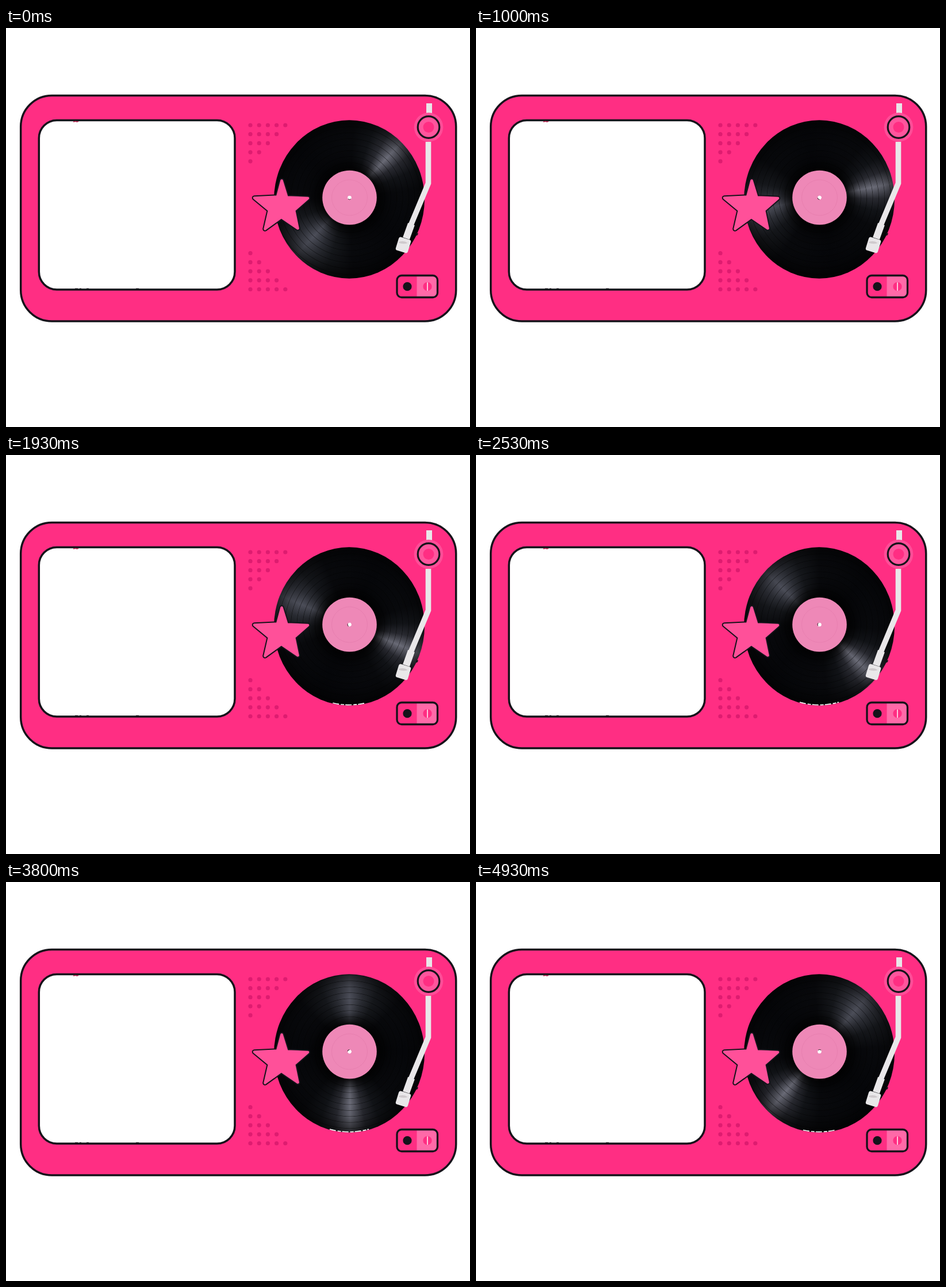
Recreate the animation shown at these times as an HTML page. Size 807x694 px, loop 4990 ms.

```html
<!DOCTYPE html>
<html lang="en">
<head>
<meta charset="utf-8">
<title>Record player</title>
<style>
  html, body { margin: 0; width: 100%; height: 100%; overflow: hidden; background: #fff; }
  svg { position: absolute; left: 0; top: 0; width: 807px; height: 694px; }
  #well {
    position: absolute; left: 0; top: 0; width: 807px; height: 694px;
    clip-path: ellipse(131px 137.7px at 597px 298px);
  }
  #record {
    position: absolute; left: 452.5px; top: 150px; width: 290px; height: 290px; border-radius: 50%;
    background:
      radial-gradient(circle, rgba(0,0,0,.8) 48px, rgba(0,0,0,.5) 58px, rgba(0,0,0,.12) 70px,
        rgba(0,0,0,0) 92px, rgba(0,0,0,.15) 114px, rgba(0,0,0,.6) 137px),
      repeating-radial-gradient(circle, transparent 0 8px, rgba(0,0,0,.5) 8.8px, transparent 9.6px 10.4px),
      conic-gradient(#050609, #08090c 50deg, #111317 66deg, #292a31 78deg, #6c6d79 90deg,
        #292a31 102deg, #111317 114deg, #08090c 130deg, #050609 180deg,
        #08090c 225deg, #15171b 245deg, #2a2c33 257deg, #4d4f5a 270deg,
        #2a2c33 283deg, #15171b 295deg, #08090c 315deg, #050609);
  }
</style>
</head>
<body>
<svg viewBox="0 0 807 694">
  <g stroke="#15131a" stroke-width="3.5">
    <rect x="25.7" y="117.5" width="757" height="392.5" rx="54" fill="#ff2e83"/>
    <rect x="57.3" y="160.5" width="340.7" height="294.5" rx="31" fill="#fff"/>
  </g>
  <path d="M117 163.2l4-1 2 1 3-.6" fill="none" stroke="#b5234e" stroke-width="1.5"/>
  <path d="M120 453.6h5m3 0h3m9 0h4m82-.2h5" stroke="#15131a" stroke-width="1.5"/>
  <g id="dots" fill="#de1c70"></g>
</svg>
<div id="well"><div id="record"></div></div>
<svg viewBox="0 0 807 694">
  <circle cx="597.5" cy="295" r="47.3" fill="#ee88b7"/>
  <g id="label">
    <circle cx="597.5" cy="295" r="31" fill="none" stroke="#e67eae" stroke-width=".8"/>
    <circle cx="597.5" cy="295" r="3.3" fill="#fff"/>
    <path d="M595 297.2a3.3 3.3 0 0 0 4.6.3" fill="none" stroke="#4a303b"/>
  </g>
  <path id="rim" fill="none" stroke="#fff" stroke-width="1.6" stroke-dasharray="11 3 6 2"/>
  <path d="M714 356l3 1.500-1.500 3-3 1z" fill="#15131a"/>

  <g stroke-linejoin="round">
    <path id="outline" fill="#15131a" stroke="#15131a" stroke-width="8.600"/>
    <path id="star" fill="#ff5099" stroke="#ff5099" stroke-width="4.600"/>
  </g>

  <g fill="none" stroke="#e9e7e9">
    <path d="M736 131V150" stroke-width="10"/>
    <path d="M734.500 198V270L704 343" stroke-width="9.600"/>
    <path d="M705 341L696 366" stroke-width="12.500"/>
  </g>
  <rect x="-11" y="-12" width="22" height="24" rx="3.500" fill="#e9e7e9" transform="translate(691 377.500) rotate(17)"/>
  <path d="M682 373q8-5 17 1q-9 3-17-1" fill="#cfcacd"/>

  <circle cx="735" cy="172.500" r="25.300" fill="#ff4e98"/>
  <circle cx="735" cy="172.500" r="18.800" fill="#ff559d" stroke="#15131a" stroke-width="3.200"/>
  <circle cx="735" cy="172.500" r="9.500" fill="#ff2e83"/>

  <path d="M714.500 431H743q7 0 7 7v23q0 7-7 7H714.500z" fill="#ff69a8"/>
  <rect x="680" y="430.500" width="70.500" height="38" rx="8" fill="none" stroke="#15131a" stroke-width="3.300"/>
  <circle cx="698" cy="449.700" r="7.600" fill="#15131a"/>
  <circle cx="733" cy="449.700" r="7.600" fill="#ff2e83"/>
  <path d="M733 442.500v14.500" stroke="#ffc4dc" stroke-width="2"/>
</svg>
<script>
  const LOOP = 4990, STEPS = 75;
  const $ = id => document.getElementById(id);

  // Two triangular speaker grilles
  const pitch = 15.4;
  let dots = "";
  for (let row = 0; row < 5; row++) {
    for (let col = 0; col < 5 - row; col++) {
      const x = 425 + col * 15.2;
      for (const y of [169 + row * 15.7, 454.5 - row * 15.7])
        dots += `<circle cx="${x}" cy="${y}" r="3.6"/>`;
    }
  }
  $("dots").innerHTML = dots;

  const starPath = "M479.5 265.5L488.500 294.500L525 296L501 317L507.500 348.500L479 329L450.500 349.500L458 317L432 295.500L472 293.500Z";
  $("star").setAttribute("d", starPath);
  $("outline").setAttribute("d", starPath);

  // Thin gap that opens under the record while it turns
  function rimPath(half) {
    const y = 298 + 136.6 * Math.sqrt(1 - (half / 131) ** 2);
    return `M${597 - half} ${y}A131 136.6 0 0 0 ${597 + half} ${y}`;
  }

  function render(ms) {
    const step = Math.min(STEPS - 1, Math.floor((ms % LOOP + 5) / (LOOP / STEPS)));
    const sec = step * LOOP / STEPS / 1000;
    const angle = -47 + 180 * step / STEPS;
    $("record").style.transform = `rotate(${angle}deg)`;
    $("label").setAttribute("transform", `rotate(${angle + 47} 597.5 295)`);
    const half = Math.min(34, 10 + (sec - 1) * 20, 28 + (4.93 - sec) * 6);
    $("rim").setAttribute("d", sec > 1.2 ? rimPath(half) : "");
  }

  const start = performance.now();
  function tick() {
    render(performance.now() - start);
    requestAnimationFrame(tick);
  }
  tick();
</script>
</body>
</html>
```
